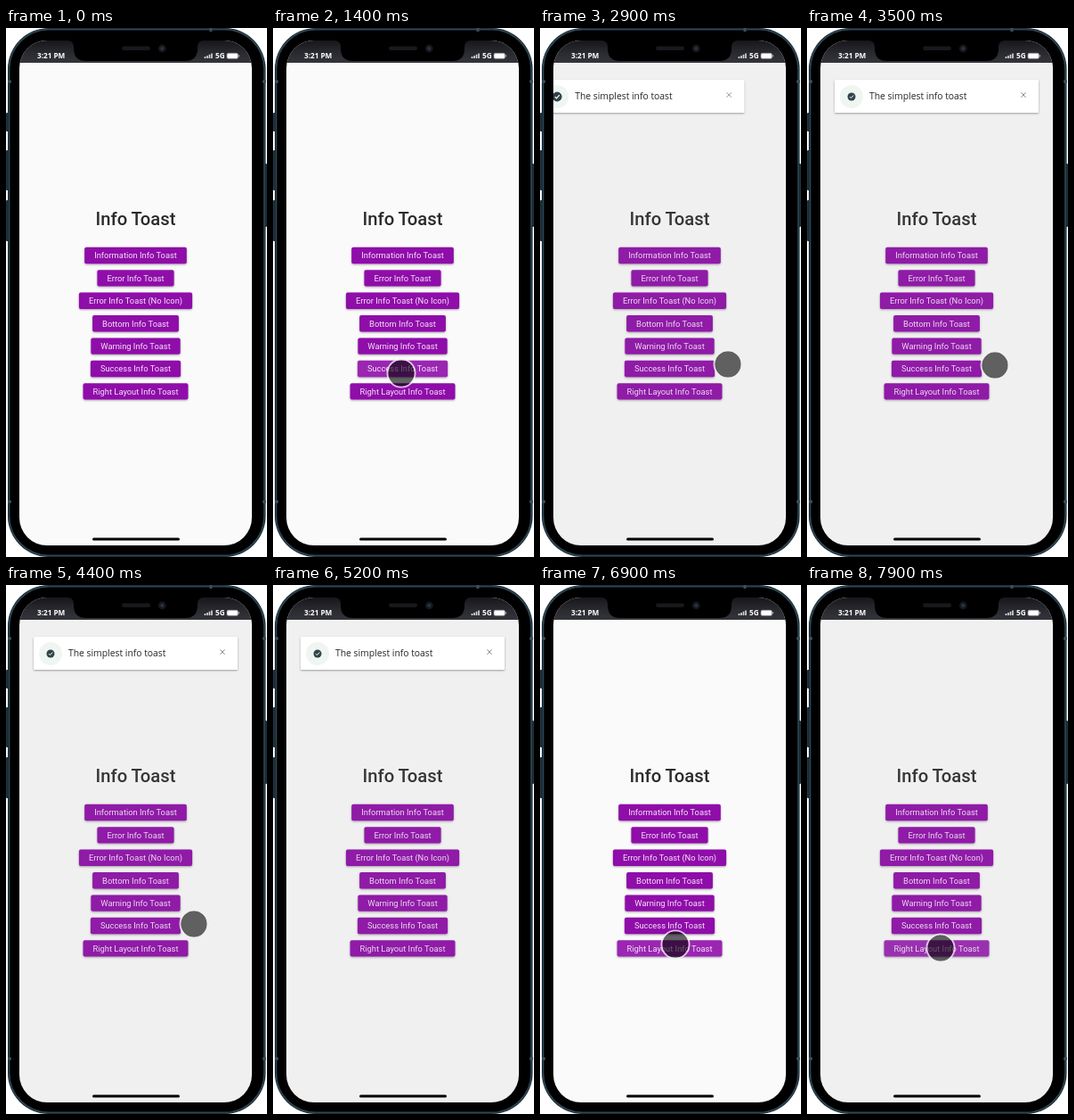
Recreate the animation shown at these times as an HTML page. Size 293 px wide and 593 px high, loop 8000 ms.

```html
<!DOCTYPE html>
<html lang="en">
<head>
<meta charset="utf-8">
<title>Info Toast</title>
<style>
html, body { margin: 0; width: 100%; height: 100%; overflow: hidden; background: #fff; }
svg { display: block; width: 293px; height: 593px; }
text { font-family: Roboto, sans-serif; }
.status { font: 700 8.2px "Open Sans", sans-serif; fill: #fff; }
.msg { font: 500 10.35px "Open Sans", sans-serif; fill: #262626; }
.title { font-size: 20.2px; font-weight: 500; fill: #2b2b2e; text-anchor: middle; }
#buttons text { font-size: 9.35px; fill: #f5e2f8; text-anchor: middle; }
.hover { opacity: 0; }
</style>
</head>
<body>
<svg viewBox="0 0 293 593">
  <defs>
    <clipPath id="screen"><rect x="15" y="14" width="261" height="566" rx="31"/></clipPath>
    <linearGradient id="bar" x1="0" y1="0" x2="0" y2="1">
      <stop offset="0" stop-color="#17171b"/><stop offset=".6" stop-color="#2b2b32"/><stop offset="1" stop-color="#34343b"/>
    </linearGradient>
    <filter id="lift" x="-10%" y="-30%" width="120%" height="180%">
      <feDropShadow dx="0" dy="1" stdDeviation="1" flood-opacity=".35"/>
    </filter>
  </defs>

  <g fill="#1d303b">
    <rect x="0" y="95" width="5" height="21" rx="1"/>
    <rect x="0" y="137" width="5" height="45" rx="1"/>
    <rect x="0" y="193" width="5" height="46" rx="1"/>
    <rect x="289" y="152" width="4" height="71" rx="1"/>
  </g>
  <rect x="2" y="0" width="289.5" height="593" rx="46" fill="#14222a"/>
  <rect x="3.6" y="1.6" width="286.3" height="589.8" rx="44.5" fill="#000" stroke="#2c4653" stroke-width="1.6"/>
  <path d="M2 60h4M288 60h4M2 531h4M288 531h4M230 0v4" stroke="#3d505b" stroke-width="3"/>

  <g clip-path="url(#screen)">
    <rect x="15" y="14" width="261" height="566" fill="#fafafa"/>
    <text class="title" x="145.5" y="221">Info Toast</text>
    <g id="buttons"></g>
    <rect id="dim" x="15" y="39" width="261" height="541" fill="#969696" fill-opacity=".1"/>
    <g id="toast">
      <rect x="31" y="58" width="229" height="37" rx="1" fill="#fff" filter="url(#lift)"/>
      <circle cx="50" cy="77" r="13" fill="#eff6f1"/>
      <g id="icon">
        <circle r="4.5" fill="#33434b"/>
        <path d="M-2 .1L-.6 1.5L2.2-1.5" fill="none" stroke="#fff"/>
      </g>
      <text class="msg" x="70" y="80.3">The simplest info toast</text>
      <path d="M240.3 72.3l5.4 5.4m0-5.4l-5.4 5.4" stroke="#777" stroke-width=".8"/>
    </g>
    <g id="cursor">
      <circle r="14.7" fill="#000" fill-opacity=".6"/>
      <circle r="15.6" fill="none" stroke="#f0f0f0" stroke-opacity=".8" stroke-width="1.8"/>
    </g>
    <rect x="15" y="14" width="261" height="25" fill="url(#bar)"/>
    <path d="M70 14Q76 15 76 21V23Q76 37 90 37H201Q215 37 215 23V21Q215 15 221 14Z" fill="#000"/>
    <rect x="97" y="571.5" width="98" height="3" rx="1.5" fill="#000"/>
  </g>

  <rect x="130" y="20.5" width="32" height="4.5" rx="2.2" fill="#17191b"/>
  <circle cx="175.3" cy="23" r="4.4" fill="#15181c"/>
  <circle cx="175.3" cy="23" r="2" fill="#2b3440"/>
  <text class="status" x="35" y="34">3:21 PM</text>
  <text class="status" x="235" y="34">5G</text>
  <path d="M223.5 34v-2M226 34v-3M228.5 34v-4.2M231 34v-5.5" stroke="#ddd" stroke-width="1.6"/>
  <rect x="248" y="28.3" width="12.4" height="6" rx="1.6" fill="#fff" stroke="#999" stroke-width=".7"/>
  <path d="M261.6 30.2v2.2" stroke="#aaa"/>
</svg>
<script>
const LOOP = 8000, CENTER = 145.5, PITCH = 25.4, PAD = 11;
const $ = id => document.getElementById(id);

const labels = ["Information Info Toast", "Error Info Toast", "Error Info Toast (No Icon)",
  "Bottom Info Toast", "Warning Info Toast", "Success Info Toast", "Right Layout Info Toast"];

$("buttons").innerHTML = labels.map((label, i) => `
  <g transform="translate(${CENTER} ${245.8 + i * PITCH})">
    <rect height="18.4" rx="2" fill="#8f0da9" filter="url(#lift)"/>
    <rect height="18.4" rx="2" fill="#fff" fill-opacity=".1" class="hover"/>
    <text y="12.7">${label}</text>
  </g>`).join("");

// Every button is as wide as its label plus padding.
for (const button of $("buttons").children) {
  const width = button.querySelector("text").getComputedTextLength() + 2 * PAD;
  for (const box of button.querySelectorAll("rect")) {
    box.setAttribute("x", -width / 2);
    box.setAttribute("width", width);
  }
}
const hovers = document.querySelectorAll(".hover");

const ramp = (t, from, to) => Math.min(1, Math.max(0, (t - from) / (to - from)));
const smooth = p => p * p * (3 - 2 * p);
const easeOut = p => 1 - (1 - p) ** 3;

// Cursor moves: start, end, dx, dy
const start = [310, 365];
const moves = [
  [400, 1300, -166, 22],
  [2000, 2700, 67, -10],
  [2900, 4400, 0, 3],
  [4600, 5200, 99, 12],
  [6400, 6900, -158, 11],
  [6900, 7200, -2, 4]
];

function draw(t) {
  let [x, y] = start;
  for (const [from, to, dx, dy] of moves) {
    const p = smooth(ramp(t, from, to));
    x += dx * p;
    y += dy * p;
  }
  $("cursor").setAttribute("transform", `translate(${x} ${y})`);

  $("dim").style.opacity = ramp(t, 1800, 2000) - ramp(t, 6400, 6600) + ramp(t, 7600, 7800);
  hovers[5].style.opacity = ramp(t, 1150, 1250) - ramp(t, 2200, 2350);
  hovers[6].style.opacity = ramp(t, 6700, 6850);

  const shown = easeOut(ramp(t, 2700, 3100)) - ramp(t, 5200, 5600) ** 2;
  $("toast").setAttribute("transform", `translate(${250 * (shown - 1)} 0)`);
  const size = 1.2 - 0.2 * easeOut(ramp(t, 2900, 3200));
  $("icon").setAttribute("transform", `translate(50 77) scale(${size})`);
}

function tick() {
  draw(performance.now() % LOOP);
  requestAnimationFrame(tick);
}
tick();
</script>
</body>
</html>
```
